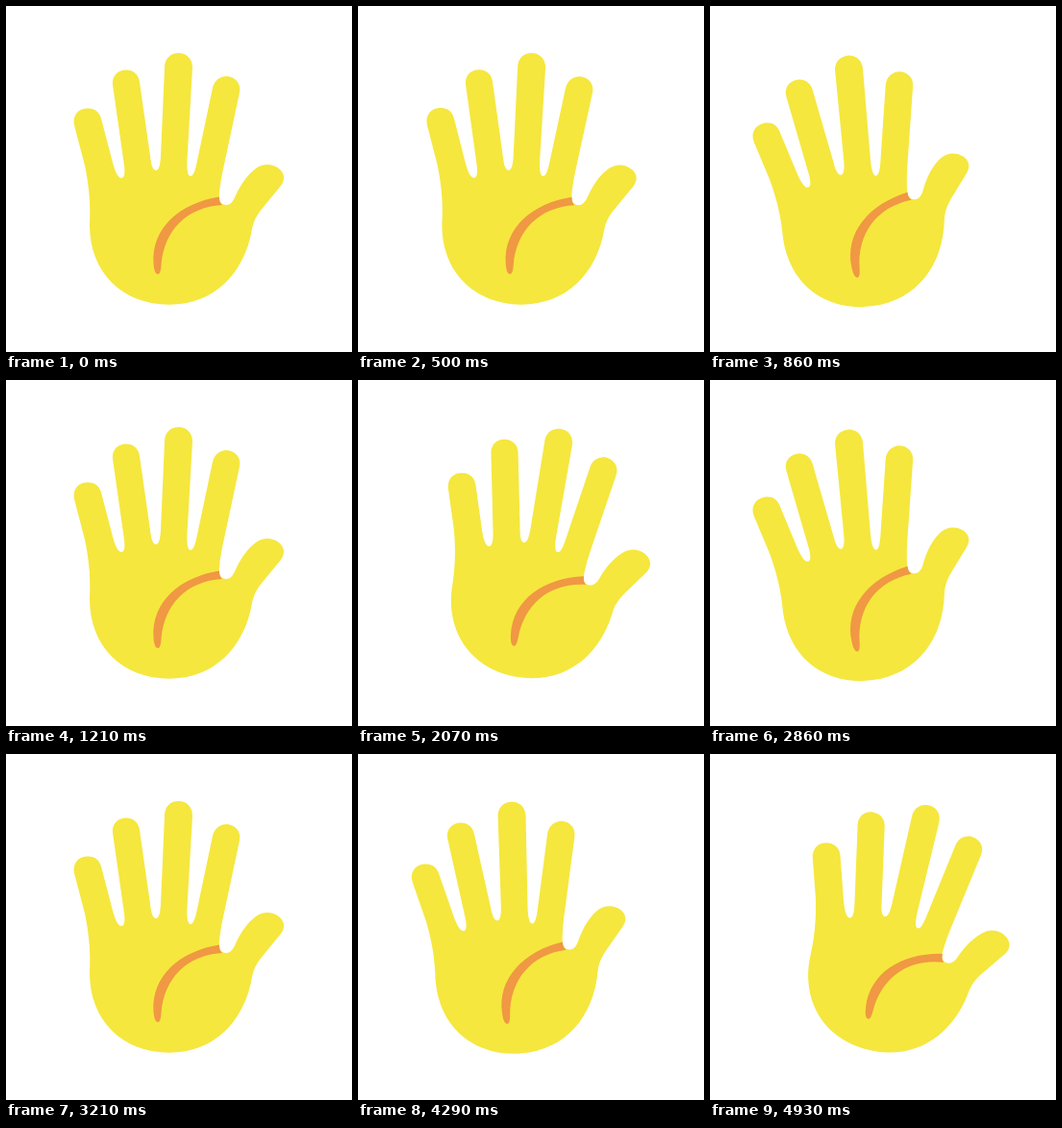
Write an HTML page that moves like this. It is 360 px wide and 360 px high and loops after 5000 ms.

```html
<!DOCTYPE html>
<html lang="en">
<head>
<meta charset="utf-8">
<title>Waving hand</title>
<style>
  html, body { margin: 0; width: 100%; height: 100%; overflow: hidden; background: #fff; }
  svg { display: block; width: 100vw; height: 100vh; }
</style>
</head>
<body>
<svg viewBox="0 0 360 360">
  <g id="hand">
    <path fill="#f5e73e" d="M71 124C69 114 75 107 84 106.5C92 106 97 110 99 117
      L111 163C114 174 117 179 120 179C123 179 124 175 123 166
      L111 82C110 73 116 66.5 125 66.5C132 66.5 138 71 139 79
      L150 156C151 166 153 171 156 171C159 171 160.5 166 161 156
      L165 64C165 55 171 49 179.5 49C188 49 194 55 194 64
      L188.5 160C188 170 189 177 192 177C195 177 197 171 199 161
      L215 85C217 77 223 73 230 73C239 74 245 81 243 90
      L225.5 172C223.5 182 222.5 189 222 195C221 202 223 207 229 207C234 207 237 202 239 197
      C245 184 252 175 260 169C268 163 278 164 285 170C290 175 290.5 181 286 187
      L270 206.5C262 216 258 222 256 232C248 279 216 310.7 170 310.7
      C121 310.7 87 277 87 228C88 208 87 190 82 166Z"/>
    <path fill="#f09843" d="M222 198.5C181 205 151 231 153.5 268C154 276 156 279 158 279
      C160 279 161 276 161.5 270C164 234 188 209 225 207C222 204 222 201 222 198.5Z"/>
  </g>
</svg>
<script>
  const LOOP = 5000, WAVE = 2000, FPS = 14;
  // [ms, degrees], eased from one to the next
  const keys = [[0, 0], [157, 15.5], [385, -18], [602, 15.5], [780, -20.5], [975, 15.5], [1200, 0], [WAVE, 0]];
  const hand = document.getElementById('hand');
  const ease = u => u * u * (3 - 2 * u);

  function angleAt(ms) {
    const i = keys.findIndex(([t]) => t > ms);
    const [t0, a0] = keys[i - 1], [t1, a1] = keys[i];
    return a0 + (a1 - a0) * ease((ms - t0) / (t1 - t0));
  }

  function draw() {
    const step = Math.floor(performance.now() % LOOP * FPS / 1000 + 0.1);
    const angle = angleAt(step * 1000 / FPS % WAVE);
    hand.setAttribute('transform', `rotate(${angle} 180 313)`);
    requestAnimationFrame(draw);
  }
  draw();
</script>
</body>
</html>
```
